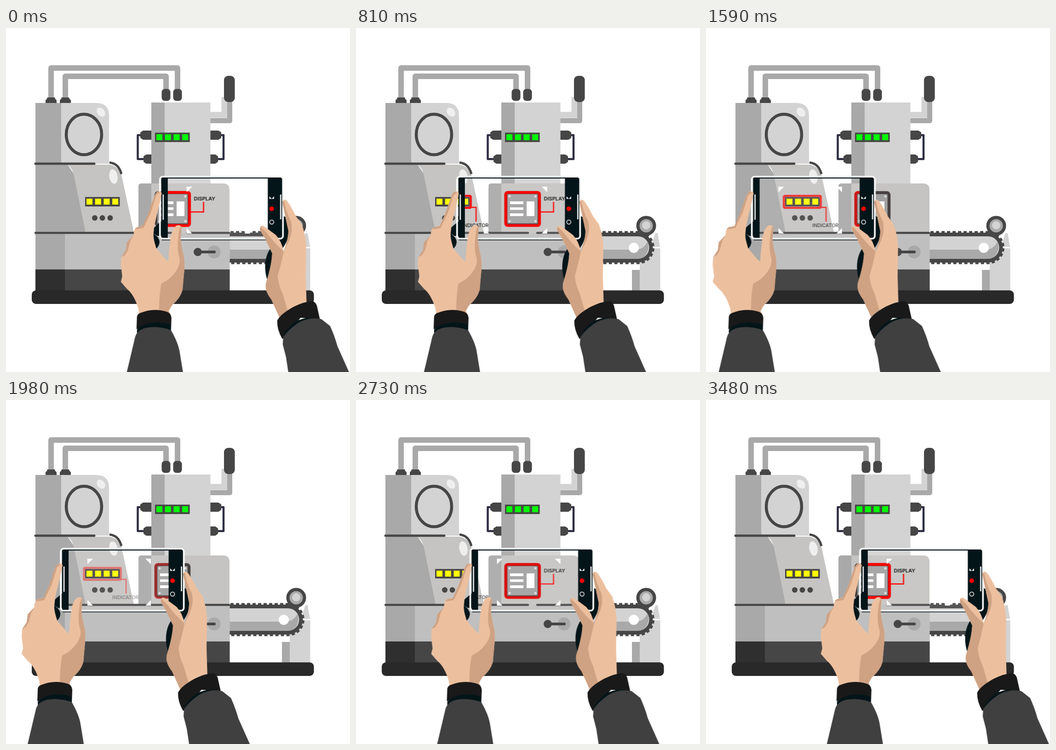
An HTML page for the animation above (3.51 s loop, 748 by 748 pixels).

```html
<!DOCTYPE html>
<html lang="en">
<head>
<meta charset="utf-8">
<title>Machine scan</title>
<style>
  html, body { margin: 0; width: 100%; height: 100%; overflow: hidden; background: #fff; }
  svg { display: block; width: 748px; height: 748px; }

  .dark { fill: #474646; }
  .mid { fill: #a9a9a9; }
  .light { fill: #d3d3d3; }
  .panel { fill: #c5c4c2; }
  .white { fill: #fff; }
  .shine { fill: #efefef; }
  .ink { fill: #041519; }
  .skin { fill: #ecc09f; }
  .shade { fill: #cfa283; }
  .cuff { fill: #191919; }
  .sleeve { fill: #404040; }
  .line { fill: none; stroke: #474646; stroke-width: 5; stroke-linecap: round; }
  .pipe { fill: none; stroke: #a9a9a9; stroke-width: 12; stroke-linejoin: round; }
  .grip { fill: none; stroke: #2e2e42; stroke-width: 4.500; stroke-linejoin: round; }
  .mark { fill: none; stroke: #f00; stroke-width: 2.6; }
  text { font: 600 11px Inter, "Open Sans", sans-serif; fill: #111; }

  .sweep, .hold, .blink {
    animation: sweep 3510ms cubic-bezier(.333, 0, .667, 1) infinite;
  }
  .hold { animation-name: hold; }
  .blink { animation-name: blink; }

  /* The sweep turns at 1650 ms and rests from 3480 ms. */
  @keyframes sweep {
    0%, 99.145%, 100% { transform: translateX(.7px); }
    47.009% { transform: translateX(-235.3px); }
  }
  /* Cancels the sweep for what stays fixed behind the screen. */
  @keyframes hold {
    0%, 99.145%, 100% { transform: translateX(-.7px); }
    47.009% { transform: translateX(235.3px); }
  }
  @keyframes blink {
    0%, 24.786%, 49.573%, 74.359%, 99.145%, 100% { opacity: 1; }
    12.393%, 37.179%, 61.966%, 86.752% { opacity: 0; }
  }
</style>
</head>
<body>
<svg viewBox="0 0 748 748">
  <defs>
    <clipPath id="screen"><rect x="351" y="326" width="218" height="130"/></clipPath>
    <g id="lamps">
      <rect class="dark" width="75.500" height="20.500"/>
      <path d="M3 3.5h13v13h-13z m18.700 0h13v13h-13z m18.700 0h13v13h-13z m18.700 0h13v13h-13z"/>
    </g>
    <path id="plug" class="dark" d="M-8 -7h16l1 3 3 3v8h-24v-8l3 -3z"/>
    <rect id="socket" class="dark" x="-9.500" y="-13" width="19" height="26" rx="7"/>
    <path id="knobs" class="dark" d="M0 223h-19l-6 4v12l6 4h19z M0 275h-12l-6 4v12l6 4h12z"/>
  </defs>

  <g id="machine">
    <!-- pipes -->
    <path class="pipe" d="M98 156V87H373V138M129 156V105H348V138"/>
    <use href="#plug" x="98" y="158"/>
    <use href="#plug" x="129" y="158"/>
    <use href="#socket" x="348" y="145.500"/>
    <use href="#socket" x="373" y="145.500"/>

    <!-- left tower -->
    <path class="mid" d="M64 163h57v132h-57z"/>
    <path class="light" d="M120 163h76q28 0 28 28v104h-104z"/>
    <ellipse class="shine" cx="206.500" cy="183" rx="8" ry="11" transform="rotate(-40 206.500 183)"/>
    <ellipse cx="169.500" cy="231.500" rx="38.500" ry="44" fill="none" stroke="#474646" stroke-width="6.500"/>
    <path class="mid" d="M64 297h70l20 30 19 117h-109z"/>
    <path class="panel" d="M133 297h92q20 4 26 22l27 125h-105l-24 -117q-4 -24 -16 -30z"/>
    <ellipse class="shine" cx="233.500" cy="323" rx="9" ry="16" transform="rotate(-10 233.500 323)"/>
    <path class="line" d="M64 295H192"/>
    <path class="line" style="stroke-linecap:butt" d="M225 292.500q20 2 26 25"/>
    <use href="#lamps" x="172" y="367.500" fill="#ff0"/>
    <g class="dark">
      <circle cx="193" cy="413" r="6"/><circle cx="209.500" cy="413" r="6"/><circle cx="226.500" cy="413" r="6"/>
    </g>

    <!-- conveyor -->
    <path class="light" d="M651 446h5l5 30h-20zM617 479h44.500v95h-44.500z"/>
    <path class="mid" d="M600 526h17v48h-17z"/>
    <path class="light" d="M486 449H613a28.500 28.500 0 0 1 0 57H486z"/>
    <path class="mid" d="M486 482H606q20 0 28 -18q6 18 -6 32q-8 9 -20 9H486z"/>
    <path d="M486 449H613a28.500 28.500 0 0 1 0 57H486" fill="none" stroke="#474646" stroke-width="8"/>
    <path d="M488 443.500H613a34 34 0 0 1 0 68H486" fill="none" stroke="#474646" stroke-width="4" stroke-dasharray="7 5"/>
    <circle class="white" cx="604" cy="478" r="11"/>
    <circle class="mid" cx="631" cy="430" r="18" stroke="#474646" stroke-width="7"/>
    <circle class="light" cx="631" cy="429" r="9"/>

    <!-- crank and column -->
    <path d="M444 189H475V150" fill="none" stroke="#d3d3d3" stroke-width="13"/>
    <path class="pipe" d="M444 201.500H486.500V150" style="stroke-width:11"/>
    <rect class="dark" x="474" y="104" width="23.500" height="57" rx="9"/>
    <path class="grip" d="M294 233H286.500V285H302M466 233H473V285H458"/>
    <use href="#knobs" x="317"/>
    <use href="#knobs" transform="translate(443) scale(-1 1)"/>
    <path class="mid" d="M316 162h30v178h-30z"/>
    <path class="light" d="M345 162h99.500v178h-99.500z"/>
    <use href="#lamps" x="324" y="227.500" fill="#0f0"/>

    <!-- cabinet -->
    <path class="mid" d="M317 338h-23q-6 0 -6 6v102h29z"/>
    <path class="panel" d="M316 338h156q14 0 14 14v94h-170z"/>
    <rect x="326" y="358" width="72" height="70" rx="5" fill="#a0a0a0" stroke="#474141" stroke-width="6.500"/>
    <path class="white" d="M335 377h29v6h-29zM335 390h29v5.500h-29zM335 403h29v6h-29zM371 377h17v32h-17z"/>
    <g fill="#ddd">
      <circle cx="334" cy="366" r="2.500"/><circle cx="390" cy="366" r="2.500"/>
      <circle cx="334" cy="420" r="2.500"/><circle cx="390" cy="420" r="2.500"/>
    </g>

    <!-- bed -->
    <path class="mid" d="M64 446h64v79h-64z"/>
    <path d="M128 446h358.500v79h-358.500z" fill="#bfbfbf"/>
    <path d="M64 525h64v48h-64z" fill="#2f2f2f"/>
    <path class="dark" d="M128 525h358.500v48h-358.500z"/>
    <path class="line" style="stroke-width:4.500" d="M64 445.500H374M394 445.500H485"/>
    <circle class="mid" cx="452.500" cy="487" r="14"/>
    <path class="line" style="stroke-width:6" d="M417 487H453"/>
    <circle class="dark" cx="417" cy="487" r="9"/>
    <rect x="56" y="570.500" width="613.500" height="29.500" rx="9" fill="#292929"/>
  </g>

  <g class="sweep" clip-path="url(#screen)">
    <rect class="white" x="351" y="326" width="218" height="130" opacity=".08"/>
    <g class="hold">
      <g class="blink">
        <rect class="mark" x="325.500" y="357.500" width="73.500" height="72" rx="4" style="stroke-width:6"/>
        <path class="mark" d="M401 400H429.500V378"/>
        <text x="408.500" y="374.500">DISPLAY</text>
        <rect class="mark" x="169.500" y="365" width="80" height="26" rx="2" style="stroke-width:4.500"/>
        <path class="mark" d="M241 390H261V421"/>
        <text x="231" y="433" style="font-size:10.600px;font-weight:500">INDICATOR</text>
      </g>
    </g>
    <path class="white" d="M392 345h12l-12 12zM530 345h-12l12 12zM392 447h12l-12 -12zM530 447h-12l12 -12z"/>
  </g>

  <g class="sweep">
    <!-- fingers behind the phone -->
    <path class="ink" d="M351 414L336 421 321 434 320 446 328 452H351zM319 446Q334 456 333 467 331 477 324 481z"/>
    <path class="ink" d="M598 406Q617 414 616 435 614 462 600 480L592 568 570 554C559 530 560 495 577 476L594 450z"/>

    <!-- phone -->
    <path class="ink" d="M337 326h14v131h-14zM568.500 326h32v131h-32z"/>
    <path d="M338 326H600" stroke="#041519" stroke-width="2.500"/>
    <path d="M338 460.700H598" stroke="#041519" stroke-width="1.500"/>
    <rect x="334" y="323.200" width="267.500" height="134.800" rx="6" fill="none" stroke="#fff" stroke-width="3.600"/>
    <path d="M341 362V417M596.500 362V416" stroke="#fff" stroke-width="2.500"/>
    <path class="white" d="M572 366l5 5.500h-5zM582 366l-5 5.500h5z"/>
    <circle cx="577" cy="393" r="5" fill="#f00"/>
    <circle cx="577" cy="422" r="4.500" fill="none" stroke="#fff" stroke-width="1.500"/>

    <!-- left arm -->
    <path class="skin" d="M328 356Q334 353 338 359L332 387 324 420Q319 442 320 458L326 479 345 502 352 508Q354 480 357 456 360 438 369 430 378 426 381 434L379 460Q381 480 386 497 388 512 387 525L383 570Q378 588 360 603L353 615 356 630H290L287 610Q278 580 262 567L249 552 252 540 249 515 250 497Q260 492 262 482V466L277 450Q277 434 285 433L297 430 309 402 323 362z"/>
    <path class="shade" d="M328 356L323 362 309 402 296 431 284 433 280 438 298 435 314 402 326 364 334 357z"/>
    <path class="shade" d="M262 466L277 450 270 462 264 484 258 494 250 498 260 483z"/>
    <path class="shade" d="M380 431Q375 437 374 455 370 482 377 502 379 524 352 547L337 556Q332 580 332 622H356L353 615 360 603Q378 588 383 570L387 525Q388 512 386 497 381 480 379 460L381 434z"/>
    <path class="cuff" d="M283 655L284 628Q285 621 293 619 320 608 349 617 358 620 359 630L358 658Q325 640 283 655z"/>
    <path class="ink" d="M284 656Q300 640 330 640 350 641 358 646V659L320 653 284 664z"/>
    <path class="sleeve" d="M262 748L280 672Q284 657 303 652 330 647 358 657 374 685 377 705L384 748z"/>

    <!-- right arm -->
    <path class="skin" d="M600 379Q602 371 608 374 614 378 630 410L642 426Q651 450 652 475L651 540 653 605 594 630 576 590Q560 570 565 553 577 515 578 490L562 457 551 438Q551 428 559 430L586 450Q599 464 603 486 614 456 613 440z"/>
    <path class="shade" d="M600 379L604 375Q608 400 619 420 624 440 615 462L603 487Q597 515 590 540 592 560 601 578L612 616 594 630 576 590Q560 570 565 553 577 515 578 490L562 457 551 438 553 432 566 445Q580 465 603 486 614 456 613 440z"/>
    <path class="cuff" d="M600 676Q588 655 589 636 596 622 625 606 648 595 664 594 671 594 675 603L682 634 640 630 600 676z"/>
    <path class="ink" d="M600 676Q606 655 630 638 655 625 682 633L650 642 606 672z"/>
    <path class="sleeve" d="M613 748L608 715 601 688 602 672Q614 655 635 641 660 627 685 633L704 648Q714 670 720 692L745 748z"/>
  </g>
</svg>
</body>
</html>
```
